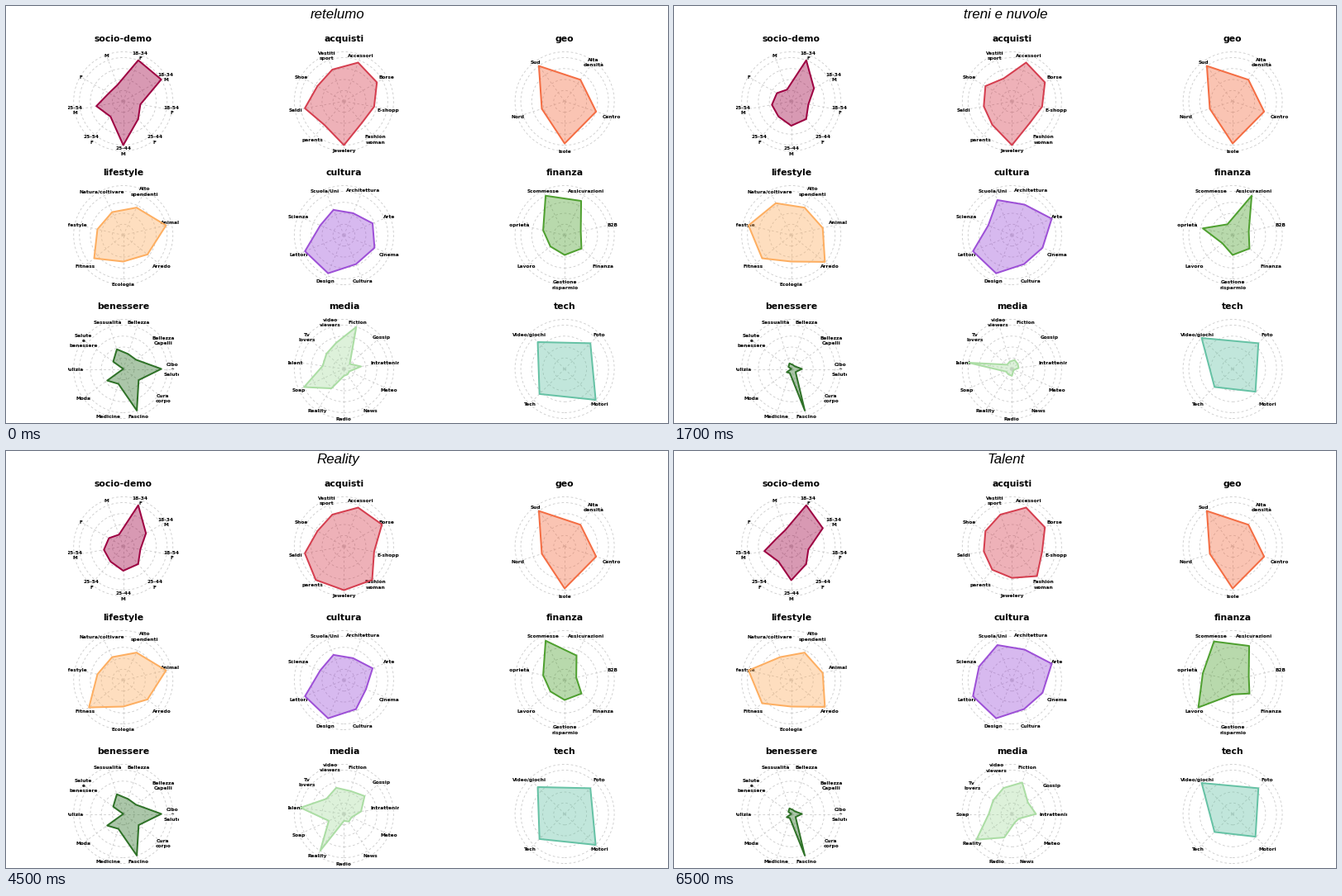
A matplotlib script that plays this animation: 800x505 px, repeating every 8000 ms.

```python
import numpy as np
import matplotlib.pyplot as plt
from matplotlib.animation import FuncAnimation
from matplotlib.patches import Circle, Polygon, Rectangle

WIDTH, HEIGHT, DPI = 800, 505, 100
PX = 72 / DPI
FULL = 53            # radius of a category at its maximum
LOW, FAINT = 0.72, 0.28   # shares of the typical radius
RIM = 60
LABEL_RADIUS = 59.5
CLIP = 67
LINE_STEP = 6.3
GRID = dict(edgecolor="#cdcdcd", facecolor="none", linewidth=0.9 * PX,
            linestyle=(0, (3, 3)), zorder=1)

# Title, colour and the typical radius of each category, clockwise from the top.
# Labels break at their spaces.
PANELS = [
    ("socio-demo", "#9e0142",
     {"18-34 F": 53, "18-34 M": 44, "18-54 F": 21, "25-44 F": 28, "25-44 M": 41,
      "25-54 F": 24, "25-54 M": 33, "F": 20, "M": 21}),
    ("acquisti", "#d53e4f",
     {"Accessori": 50, "Borse": 46, "E-shopping": 37, "Fashion woman": 47,
      "Jewelery": 53, "parents": 37, "Saldi": 48, "Shoe": 37, "Vestiti sport": 41}),
    ("geo", "#f46d43",
     {"Alta densità": 45, "Centro": 40, "Isole": 51, "Nord": 29, "Sud": 53}),
    ("lifestyle", "#fdae61",
     {"Alto spendenti": 37, "Animali ": 39, "Arredo": 52, "Ecologia": 32,
      "Fitness": 45, "Lifestyle": 32, "Natura/coltivare": 43}),
    ("cultura", "#9d50d7",
     {"Architettura": 40, "Arte": 52, "Cinema": 40, "Cultura": 38, "Design": 50,
      "Lettori": 51, "Scienza": 43, "Scuola/Uni": 46}),
    ("finanza", "#4fa030",
     {"Assicurazioni": 46, "B2B": 20, "Finanza": 26, "Gestione risparmio": 24,
      "Lavoro": 22, "Proprietà": 37, "Scommesse": 52}),
    ("benessere", "#2f7228",
     {"Bellezza": 19, "Bellezza Capelli": 19, "Cibo ^ Salute": 46, "Cura corpo": 23,
      "Fascino": 53, "Medicine": 19, "Moda": 24, "Pulizia": 0,
      "Salute e benessere": 15, "Sessualità": 25}),
    ("media", "#abdda4",
     {"Fiction": 40, "Gossip": 33, "Intrattenimento": 29, "Meteo": 10, "News": 11,
      "Radio": 30, "Reality": 28, "Soap": 28, "Talent": 36, "Tv lovers": 28,
      "video viewers": 33}),
    ("tech", "#66c2a5",
     {"Foto": 44, "Motori": 39, "Tech": 43, "Video/giochi": 46}),
]


def show(name, peaks, low, faint="", absent=""):
    """A panel title under `faint` shrinks the whole panel except its peaks."""
    return name, *({item.strip() for item in group.split(",")}
                   for group in (peaks, low, faint, absent))


SHOWS = [
    show("retelumo",
         peaks="18-34 M, 25-44 M, Animali, Scommesse, Fiction, Soap, Motori",
         low="Fashion woman, Alta densità, Arredo, Natura/coltivare, Architettura,"
             "Arte, Scienza, Scuola/Uni, Proprietà, Meteo, News, Intrattenimento, Talent",
         faint="Gossip, Radio"),
    show("treni e nuvole",
         peaks="Lifestyle, Assicurazioni, Fascino, Talent, Video/giochi",
         low="18-34 M, 25-44 M, 25-54 M, M, Fashion woman, Saldi, Vestiti sport,"
             "Alta densità, Scienza, Lavoro, Tech",
         faint="Scommesse, benessere, media"),
    show("Radio",
         peaks="18-34 M, 25-44 M, Nord, Architettura, Lavoro, Cura corpo, Moda,"
               "Intrattenimento, Talent, Foto",
         low="E-shopping, Fashion woman, Saldi, Centro, Isole, Sud, Alto spendenti,"
             "Animali, Ecologia, Natura/coltivare, Cinema, Lettori, Scienza, Scuola/Uni,"
             "Assicurazioni, B2B, Finanza, Gestione risparmio, Proprietà, Fascino,"
             "Reality, Motori, Tech",
         faint="Accessori, Borse, parents, Vestiti sport, Scommesse, Fiction,"
               "Tv lovers, video viewers",
         absent="Radio"),
    show("Reality",
         peaks="Borse, Fashion woman, parents, Animali, Fitness, Scommesse, Reality,"
               "Talent, Motori",
         low="18-34 M, 25-44 M, 25-54 M, M, Alta densità, Arredo, Natura/coltivare,"
             "Architettura, Arte, Cinema, Scienza, Scuola/Uni, Assicurazioni, B2B,"
             "Proprietà, Fiction, Intrattenimento, Soap",
         faint="Radio"),
    show("Talent",
         peaks="Lifestyle, Lavoro, Fascino, Reality, Video/giochi",
         low="Jewelery, Saldi, Alta densità, Natura/coltivare, Gestione risparmio,"
             "Gossip, Tech",
         faint="benessere",
         absent="Talent"),
]

fig = plt.figure(figsize=(WIDTH / DPI, HEIGHT / DPI), dpi=DPI, facecolor="white")
ax = fig.add_axes([0, 0, 1, 1])


def write(x, y, text, size, **style):
    return ax.text(x, y, text, fontsize=size * PX, ha="center", va="baseline",
                   color="black", **style)


def draw_label(x, y, text, clip):
    lines = text.split(" ")
    top = y - 2.5 + (len(lines) - 1) / 2 * LINE_STEP
    for i, line in enumerate(lines):
        label = write(x, top - i * LINE_STEP, line, 5.9, family="DejaVu Sans",
                      weight="bold", clip_on=True, zorder=2)
        label.set_clip_path(clip)


def radius(label, typical, title, peaks, low, faint):
    name = label.strip()
    if name in peaks:
        return FULL
    if name in faint or title in faint:
        return FAINT * typical
    return LOW * typical if name in low else typical


def draw_radar(cx, cy, title, color, typical, peaks, low, faint, absent):
    names = [name for name in typical if name not in absent]
    radii = np.array([radius(name, typical[name], title, peaks, low, faint)
                      for name in names])
    angles = np.pi / 2 - (np.arange(len(names)) + 0.5) * 2 * np.pi / len(names)
    center = np.array([cx, cy])
    spokes = np.column_stack([np.cos(angles), np.sin(angles)])
    clip = Rectangle((cx - CLIP, cy - CLIP), 2 * CLIP, 2 * CLIP,
                     transform=ax.transData)

    write(cx, cy + 72.5, title, 10.9, family="DejaVu Sans", weight="bold")
    for ring in (1.5, *np.arange(1, 5) * FULL / 4, RIM):
        ax.add_patch(Circle(center, ring, **GRID))
    for spoke, name in zip(spokes, names):
        ax.add_patch(Polygon([center, center + RIM * spoke], closed=False, **GRID))
        draw_label(*(center + LABEL_RADIUS * spoke), name, clip)

    points = center + spokes * radii[:, None]
    ax.add_patch(Polygon(points, facecolor=color, alpha=0.4, linewidth=0, zorder=3))
    ax.add_patch(Polygon(points, facecolor="none", edgecolor=color,
                         linewidth=2 * PX, joinstyle="round", zorder=4))


def draw(frame):
    name, *groups = SHOWS[(frame + 3) // 4]
    ax.clear()
    ax.set(xlim=(0, WIDTH), ylim=(0, HEIGHT))
    ax.axis("off")
    write(401, 490, name, 16.9, family="Liberation Sans", style="italic")
    for i, panel in enumerate(PANELS):
        row, col = divmod(i, 3)
        draw_radar(141.7 + 266.7 * col, 389.5 - 162 * row, *panel, *groups)
    return []


animation = FuncAnimation(fig, draw, frames=16, interval=500, repeat=True,
                          repeat_delay=0, init_func=lambda: draw(0))
plt.show()
```
